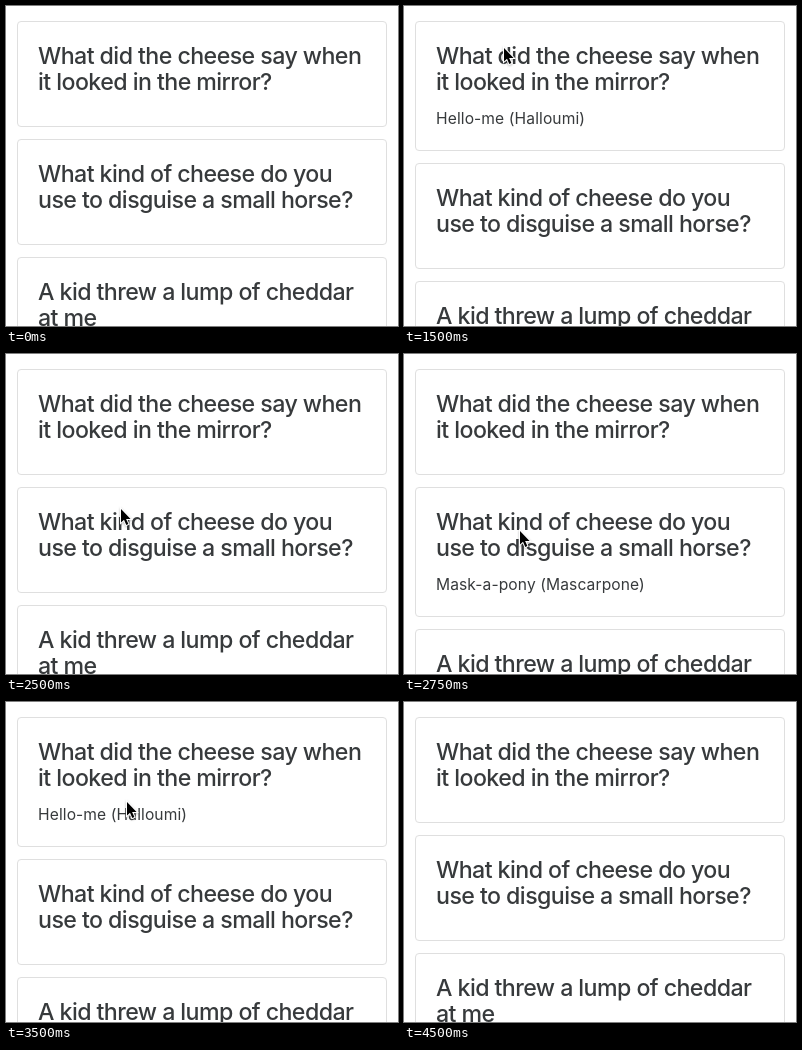
An HTML page that plays this animation: 392 by 320 pixels, repeating every 5000 ms.

```html
<!DOCTYPE html>
<html lang="en">
<head>
<meta charset="utf-8">
<title>Cheese jokes</title>
<style>
  html, body { margin: 0; width: 100%; height: 100%; overflow: hidden; background: #fff; }
  svg { display: block; }
  text { font-family: Inter, "Liberation Sans", sans-serif; fill: #373a3c; }
  rect { fill: #fff; stroke: #dfdfdf; }
  .question { font-size: 23.2px; font-weight: 500; letter-spacing: -.57px; }
  .answer { font-size: 15.6px; letter-spacing: .1px; }
  #cursor { fill: #000; stroke: #fff; paint-order: stroke; stroke-width: 2px; filter: drop-shadow(0 1px 1px #0004); }
</style>
</head>
<body>
<svg width="392" height="320" viewBox="0 0 392 320">
  <g id="cards"></g>
  <path id="cursor" d="M0 0V13.5L3 10.7 5.3 16 7.4 15.1 5.1 9.9H9.6Z"/>
</svg>
<script>
const LOOP = 5000;
const jokes = [
  ["What did the cheese say when", "it looked in the mirror?", "Hello-me (Halloumi)"],
  ["What kind of cheese do you", "use to disguise a small horse?", "Mask-a-pony (Mascarpone)"],
  ["A kid threw a lump of cheddar", "at me", ""]
];

// [start ms, open card (-1 for none), cursor x, cursor y]; no x hides the cursor
const steps = [
  [0, -1],
  [500, -1, 73, 12],
  [750, -1, 100, 40],
  [1000, -1, 99, 39],
  [1500, 0, 100, 42],
  [1750, 0, 109, 70],
  [2250, 0, 116, 93],
  [2500, -1, 115, 155],
  [2750, 1, 116, 177],
  [3250, 1, 117, 167],
  [3500, 0, 121, 100],
  [3750, 0, 121, 77],
  [4250, 0, 54, 19],
  [4500, -1]
];

const cursor = document.getElementById("cursor");
const list = document.getElementById("cards");
list.innerHTML = jokes.map(([first, second, answer]) => `<g>
  <rect x="11.5" y=".5" width="369" height="105" rx="3.5"/>
  <text class="question" x="32" y="43">${first}</text>
  <text class="question" x="32" y="69">${second}</text>
  <text class="answer" x="32" y="103">${answer}</text>
</g>`).join("");
const cards = [...list.children];

function draw() {
  const t = performance.now() % LOOP;
  const [, open, x, y] = steps.findLast(step => step[0] <= t);
  let top = 15;
  cards.forEach((card, i) => {
    const height = i === open ? 130 : 106;
    card.setAttribute("transform", `translate(0 ${top})`);
    card.querySelector("rect").setAttribute("height", height - 1);
    card.querySelector(".answer").style.display = i === open ? "" : "none";
    top += height + 12;
  });
  cursor.style.display = x === undefined ? "none" : "";
  if (x !== undefined) cursor.setAttribute("transform", `translate(${x} ${y})`);
  requestAnimationFrame(draw);
}
draw();
</script>
</body>
</html>
```
